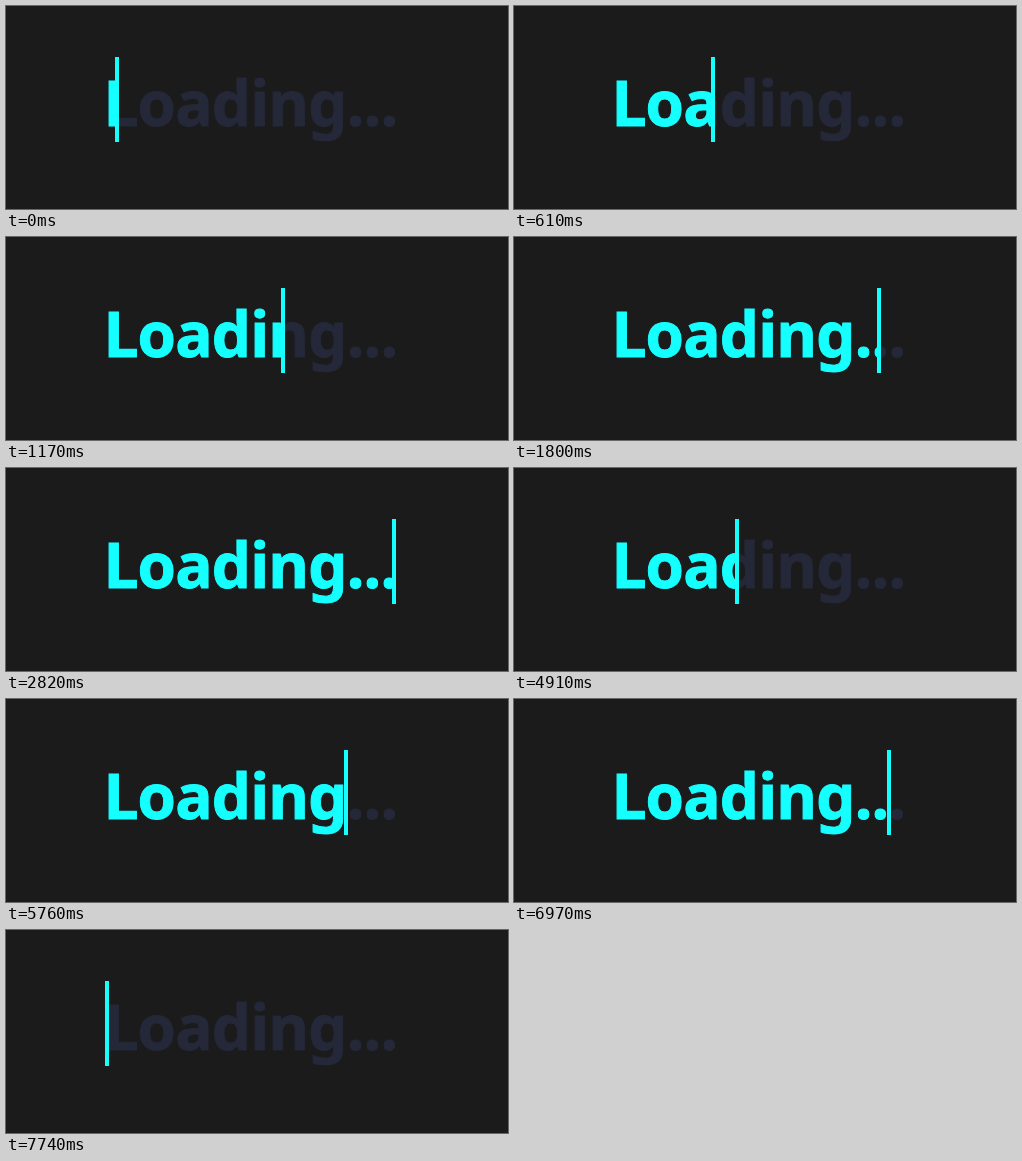
These frames come from a looping animation (502 by 203 pixels, 7950 ms). An HTML page:

```html
<!DOCTYPE html>
<html lang="en">
<head>
<meta charset="utf-8">
<title>Loading</title>
<style>
  html, body { margin: 0; width: 100%; height: 100%; overflow: hidden; background: #1b1b1b; }
  svg { display: block; width: 502px; height: 203px; }
  text {
    font: 700 62px "Noto Sans", "Open Sans", sans-serif;
    letter-spacing: -0.81px;
    stroke-width: 1px;
  }
  .dim { fill: #252839; stroke: #252839; }
  .lit { fill: #16ffff; stroke: #16ffff; }
</style>
</head>
<body>
<svg viewBox="0 0 502 203">
  <defs>
    <clipPath id="reveal"><rect id="shown" x="99" y="51" width="0" height="85"/></clipPath>
  </defs>
  <text class="dim" x="97.4" y="120.2">Loading...</text>
  <text class="lit" x="97.4" y="120.2" clip-path="url(#reveal)">Loading...</text>
  <rect id="bar" x="99" y="51" width="4" height="85" fill="#16ffff"/>
</svg>
<script>
  const LOOP = 7950;            // ms
  const STEP = LOOP / 115;      // the picture advances in even steps
  const LEFT = 99, TRAVEL = 293;

  // One sweep, measured in steps: grow, hold, shrink, rest.
  const CYCLE = 59.5, GROW = 30, SHRINK_AT = 41.77, SHRINK = 11.7;
  const LEAD = 1.02;            // the loop opens just after growth begins

  const bar = document.getElementById('bar');
  const shown = document.getElementById('shown');

  const clamp = v => Math.min(1, Math.max(0, v));

  function sweep(step) {
    const p = (step + LEAD) % CYCLE;
    return clamp(p / GROW) - clamp((p - SHRINK_AT) / SHRINK);
  }

  function draw(ms) {
    const step = Math.floor((ms % LOOP) / STEP + 0.25);
    const width = Math.round(TRAVEL * sweep(step));
    bar.setAttribute('x', LEFT + width);
    shown.setAttribute('width', width);
  }

  const start = performance.now();
  function tick() {
    draw(performance.now() - start);
    requestAnimationFrame(tick);
  }
  tick();
</script>
</body>
</html>
```
